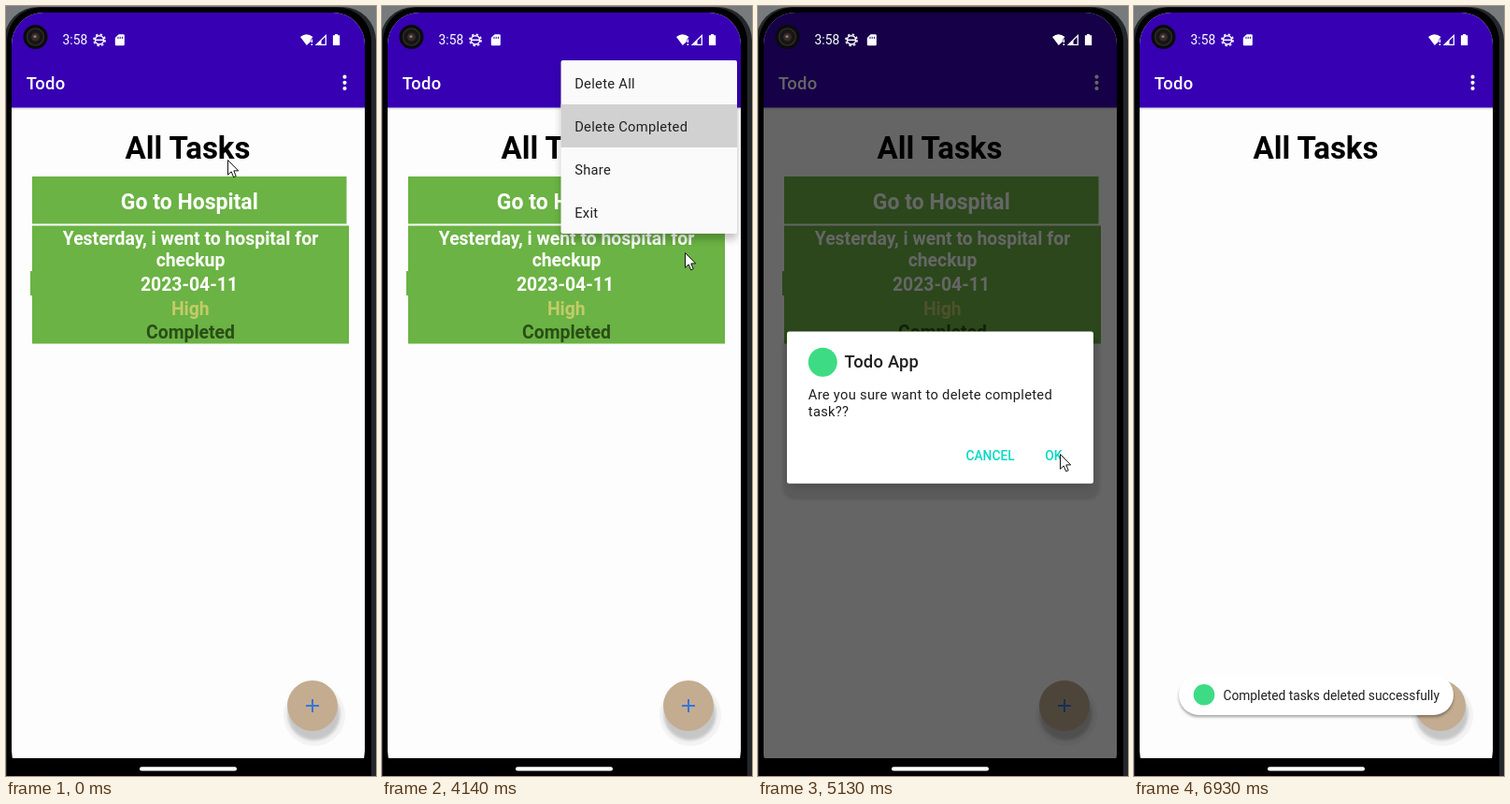
Recreate the animation shown at these times as an HTML page. Size 396 px wide and 822 px high, loop 7630 ms.

```html
<!DOCTYPE html>
<html lang="en">
<head>
<meta charset="utf-8">
<title>Todo</title>
<style>
  html, body { margin: 0; width: 100%; height: 100%; overflow: hidden; background: #000; }
  svg { display: block; width: 100%; height: 100%; font-family: Roboto, sans-serif; }
  .mid { text-anchor: middle; font-weight: 700; }
  .medium { font-weight: 500; }
  .note { font-size: 19.4px; fill: #fff; }
  .menu { font-size: 14.7px; letter-spacing: .02em; fill: #202020; }
  .button { font-size: 13.8px; font-weight: 500; fill: #03dac5; }
  .white { fill: #fff; }

  #cursor, #menu, #pressed, #task, #dim, #dialog, #toast { animation: 7.63s steps(2) infinite; }
  #cursor { animation-name: point, leave; }
  #menu { animation-name: menu; }
  #pressed { animation-name: press; }
  #task { animation-name: leave; }
  #dim { animation-name: dim; }
  #dialog { animation-name: dialog; }
  #toast { animation-name: toast; }

  @keyframes point {
    0%, 3.99% { transform: translate(237px, 164px); animation-timing-function: steps(3); }
    9.43% { transform: translate(384px, 135px); animation-timing-function: steps(4); }
    16.51%, 25.03% { transform: translate(362px, 86px); animation-timing-function: steps(7); }
    37.61% { transform: translate(237px, 126px); }
    40.75%, 49% { transform: translate(249px, 126px); animation-timing-function: steps(3); }
    54.25% { transform: translate(324px, 263px); }
    58.19% { transform: translate(312px, 308px); animation-timing-function: step-end; }
    59.76% { transform: translate(308px, 511px); animation-timing-function: steps(4); }
    67.23%, 100% { transform: translate(323px, 478px); }
  }
  @keyframes leave {
    0%, 72.85% { opacity: 1; }
    72.86%, 100% { opacity: 0; }
  }
  @keyframes menu {
    0%, 23.2% { opacity: 0; }
    26.6%, 54.25% { opacity: 1; }
    58.19% { opacity: .25; animation-timing-function: step-end; }
    59.76%, 100% { opacity: 0; }
  }
  @keyframes press {
    0%, 45.8% { opacity: 0; animation-timing-function: steps(3); }
    50.72%, 56.2% { opacity: 1; }
    56.22%, 100% { opacity: 0; }
  }
  @keyframes dim {
    0%, 54.25% { opacity: 0; }
    58.19%, 70.89% { opacity: .6; }
    70.9% { opacity: .53; }
    74.44%, 100% { opacity: 0; }
  }
  @keyframes dialog {
    0%, 54.25% { opacity: 0; }
    58.19%, 70.89% { opacity: 1; }
    70.9% { opacity: .77; }
    74.44%, 100% { opacity: 0; }
  }
  @keyframes toast {
    0%, 74.44% { opacity: 0; animation-timing-function: steps(3); }
    79.55%, 100% { opacity: 1; }
  }
</style>
</head>
<body>
<svg viewBox="0 0 396 822">
  <defs>
    <clipPath id="screen"><rect x="6" y="7" width="378" height="822" rx="34"/></clipPath>
    <filter id="soft" x="-30%" y="-30%" width="160%" height="160%"><feGaussianBlur stdDeviation="4"/></filter>
    <filter id="faint" x="-30%" y="-30%" width="160%" height="160%"><feGaussianBlur stdDeviation="1.5"/></filter>
  </defs>

  <!-- phone body -->
  <rect width="396" height="822" fill="#777b7e"/>
  <rect x="-2" y="1" width="398" height="860" rx="36" fill="#25282a"/>
  <rect x="1" y="1.5" width="390" height="860" rx="36" fill="#000"/>

  <g clip-path="url(#screen)">
    <rect y="7" width="396" height="796" fill="#fdfdfd"/>
    <rect y="107" width="396" height="3" fill="#000" opacity=".15" filter="url(#faint)"/>
    <rect y="7" width="396" height="101.5" fill="#3700b3"/>
    <text class="white medium" x="21.8" y="89" font-size="18.4" letter-spacing=".23">Todo</text>
    <path d="M362.5 75.7V88.1" stroke="#fff" stroke-width="4.2" stroke-linecap="round" stroke-dasharray="0 6.15"/>

    <text class="mid" x="194.5" y="162.8" font-size="33">All Tasks</text>

    <g id="task">
      <path fill="#6bb344" d="M28 182H364.5V232.5H28ZM28 234.5H367V360.5H28V309H26V283H28Z"/>
      <text class="mid white" x="196.3" y="217" font-size="23">Go to Hospital</text>
      <g class="mid note">
        <text x="197.5" y="255">Yesterday, i went to hospital for</text>
        <text x="197.5" y="277.7">checkup</text>
        <text x="196" y="303.5">2023-04-11</text>
        <text x="197.3" y="329.5" fill="#c3cc6a">High</text>
        <text x="197.5" y="355.3" fill="#2a4d17">Completed</text>
      </g>
    </g>

    <!-- add button -->
    <circle cx="330" cy="757" r="33" fill="#f3f3f3"/>
    <circle cx="329.5" cy="756" r="28" opacity=".18" filter="url(#faint)"/>
    <circle cx="328" cy="747" r="27" fill="#c4ac91"/>
    <path d="M321 747H335M328 740V754" stroke="#3576d8" stroke-width="2"/>

    <g id="menu">
      <rect x="192" y="63" width="188" height="186" rx="4" opacity=".24" filter="url(#soft)"/>
      <rect x="191.5" y="58" width="188.5" height="185" rx="2" fill="#fafafa"/>
      <rect id="pressed" x="191.5" y="105" width="188.5" height="46" fill="#d1d1d1"/>
      <g class="menu">
        <text x="206.2" y="87.5">Delete All</text>
        <text x="206.2" y="133.5">Delete Completed</text>
        <text x="206.2" y="179.7">Share</text>
        <text x="206.2" y="226">Exit</text>
      </g>
    </g>

    <rect id="dim" y="7" width="396" height="796"/>

    <g id="dialog">
      <rect x="26" y="352" width="340" height="175" rx="13" opacity=".1" filter="url(#faint)"/>
      <rect x="33" y="353" width="324" height="160" rx="5" opacity=".15" filter="url(#soft)"/>
      <rect x="31" y="347.5" width="328" height="162.3" rx="2.5" fill="#fff"/>
      <circle cx="69.3" cy="380.3" r="15.5" fill="#3ddc84"/>
      <g fill="#1f1f1f">
        <text class="medium" x="92.6" y="386" font-size="18.4" letter-spacing=".23">Todo App</text>
        <g font-size="14.7" letter-spacing=".3">
          <text x="53.8" y="420">Are you sure want to delete completed</text>
          <text x="53.8" y="438.3">task??</text>
        </g>
      </g>
      <g class="button">
        <text x="222.4" y="485.4">CANCEL</text>
        <text x="307.3" y="485.4">OK</text>
      </g>
    </g>

    <g id="toast">
      <rect x="48" y="717" width="294" height="42" rx="21" opacity=".35" filter="url(#faint)"/>
      <rect x="48" y="714" width="294" height="43" rx="21.5" fill="#fff"/>
      <circle cx="75" cy="735.3" r="11.3" fill="#3ddc84"/>
      <text x="95.5" y="740.5" font-size="13.75" fill="#1f1f1f">Completed tasks deleted successfully</text>
    </g>
  </g>

  <!-- status bar and hardware -->
  <g class="white">
    <text x="60.6" y="41.4" font-size="13.8">3:58</text>
    <g fill="none" stroke="#fff">
      <circle cx="100" cy="36.3" r="4.6" stroke-width="1.5"/>
      <circle cx="100" cy="36.3" r="6.1" stroke-width="1.6" stroke-dasharray="2.4 2.39"/>
      <path d="M96 36.3H104" stroke-width="1.5"/>
    </g>
    <path d="M120.5 30.3H125.5Q126.8 30.3 126.8 31.6V41Q126.8 42.3 125.5 42.3H118Q116.8 42.3 116.8 41V34Z"/>
    <path d="M120 32.8V35M122.2 32.8V35M124.4 32.8V35" stroke="#3700b3"/>
    <path d="M315 33Q321.5 27.5 328.5 33L326 36V38L321.8 42Z"/>
    <path d="M327.3 35.5V39M327.3 40.3V42" stroke="#fff" stroke-width="1.5"/>
    <path d="M342.3 31.5V41.3H332.3Z" fill="none" stroke="#fff" stroke-width="1.3"/>
    <path d="M337.5 36.5V41.3H332.5Z"/>
    <path d="M352 30H355V31.2H357.2V42H349.9V31.2H352Z"/>
    <rect x="143" y="812.3" width="104" height="4.3" rx="2.1"/>
  </g>
  <circle cx="31.5" cy="33" r="13" fill="#0b0b0b"/>
  <circle cx="31.5" cy="33" r="9" fill="#171515" stroke="#2e2b2a" stroke-width="1.5"/>
  <circle cx="31.5" cy="33" r="4.5" fill="#352b29"/>
  <circle cx="31" cy="32.5" r="1.6" fill="#937b70"/>

  <path id="cursor" d="M.5 .5V16.3L4.2 12.9L6.6 18.8L9.2 17.7L6.8 11.9H11.7Z" fill="#fff" stroke="#111" stroke-linejoin="round"/>
</svg>
</body>
</html>
```
